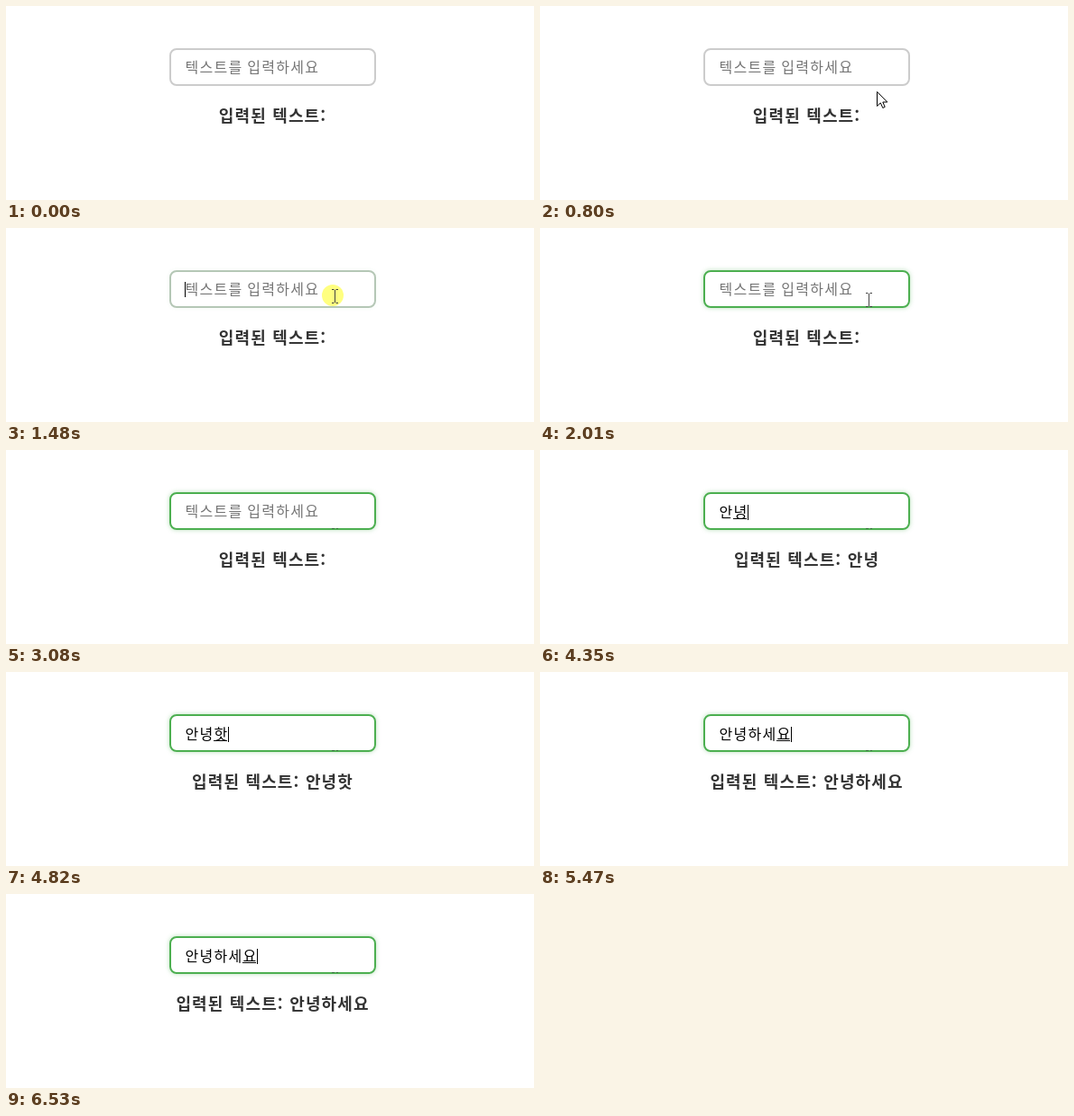
Recreate the animation shown at these times as an HTML page. Size 585 by 216 pixels, loop 6.93 s.

```html
<!DOCTYPE html>
<html lang="ko">
<head>
<meta charset="utf-8">
<style>
  html, body { margin: 0; width: 100%; height: 100%; overflow: hidden; background: #fff; }
  #field {
    position: absolute; left: 181px; top: 47px; width: 229px; height: 42px;
    box-sizing: border-box; border: 2px solid; border-radius: 8px;
  }
  svg { position: absolute; left: 0; top: 0; }
  text {
    font: 350 16px "Noto Sans CJK KR", "Noto Sans CJK JP", "Noto Sans CJK", sans-serif;
    letter-spacing: 1.28px; word-spacing: -1px;
  }
  #heading {
    font-size: 18px; font-weight: bold; fill: #333; text-anchor: middle;
    letter-spacing: 1.1px; word-spacing: .3px;
  }
  #placeholder { fill: #757575; }
</style>
</head>
<body>
<div id="field"></div>
<svg width="585" height="216">
  <text id="heading" x="295.5" y="128.5"></text>
  <text id="placeholder" x="198.4" y="74">텍스트를 입력하세요</text>
  <text id="typed" x="198.4" y="75"></text>
  <rect id="underline" y="76" width="15" height="1"/>
  <path id="residue" d="M361 87.5h3m2 0h2" stroke="#33573a" opacity=".7"/>
  <circle id="click" cx="362" cy="75" r="12" fill="#ffff80"/>
  <rect id="caret" width="1" height="17"/>
  <path id="beam" d="M-3 -7.5H-.5M1.5 -7.5H4M.5 -7V7M-3 7.5H-.5M1.5 7.5H4" fill="none" stroke="#444"/>
  <path id="arrow" d="M.5 .5V16.5L4.3 12.9L6.8 18.5L9.2 17.4L6.8 12H11.8Z" fill="#fff" stroke="#000"/>
</svg>
<script>
const LOOP = 6930, FOCUS = 1480, LEAVE = 2010, TYPE = 3610;
const CHAR = 16, LEFT = 198;
const strokes = [
  [0, ''], [TYPE, 'ㅇ'], [3820, '아'], [3940, '안'],
  [4150, '안ㄴ'], [4250, '안녀'], [4350, '안녕'],
  [4610, '안녕ㅎ'], [4710, '안녕하'], [4820, '안녕핫'],
  [5080, '안녕하세'], [5220, '안녕하셍'], [5470, '안녕하세요'],
];
const exitPath = [[364, 80], [362, 104], [360, 133]];

const $ = id => document.getElementById(id);
const within = (t, from, to) => t >= from && t < to;
const show = (id, on) => $(id).style.display = on ? '' : 'none';
const set = (id, name, value) => $(id).setAttribute(name, value);

function pointerAt(t) {
  if (t < 530) return null;
  if (t >= LEAVE) return exitPath[Math.floor((t - LEAVE) / 90)];
  const k = Math.min(7, Math.floor((t - 530) / 67)) / 7;
  const p = 1 - (1 - k) ** 2;
  return [Math.round(390 - 26 * p * p), Math.round(177 - 101 * p)];
}

function drawField(t) {
  const p = t < FOCUS ? 0 : t < 1540 ? 0.18 : t < 1610 ? 0.65 : 1;
  const mix = to => Math.round(204 + (to - 204) * p);
  $('field').style.borderColor = `rgb(${mix(76)},${mix(175)},${mix(80)})`;
  $('field').style.boxShadow = `0 0 5px rgba(76,175,80,${0.4 * p})`;
}

function drawText(t) {
  const value = strokes.findLast(([time]) => t >= time)[1];
  const end = LEFT + CHAR * value.length;
  $('heading').textContent = '입력된 텍스트: ' + value;
  $('typed').textContent = value;
  show('placeholder', !value);
  show('underline', value);
  set('underline', 'x', end - CHAR);
  set('caret', 'x', end);
  set('caret', 'y', value ? 61 : 60);
  show('caret', within(t, FOCUS, LEAVE) || within(t, 2560, 3080) || within(t, TYPE, 6000) || t >= 6530);
}

function drawPointer(t) {
  const at = pointerAt(t);
  const overField = at && at[1] < 89;
  show('beam', overField);
  show('arrow', at && !overField);
  show('click', within(t, FOCUS, 1610));
  show('residue', t >= LEAVE + 90);
  if (at) set(overField ? 'beam' : 'arrow', 'transform', `translate(${at})`);
}

function draw(now) {
  const t = now % LOOP;
  drawField(t);
  drawText(t);
  drawPointer(t);
  requestAnimationFrame(draw);
}
draw(0);
</script>
</body>
</html>
```
